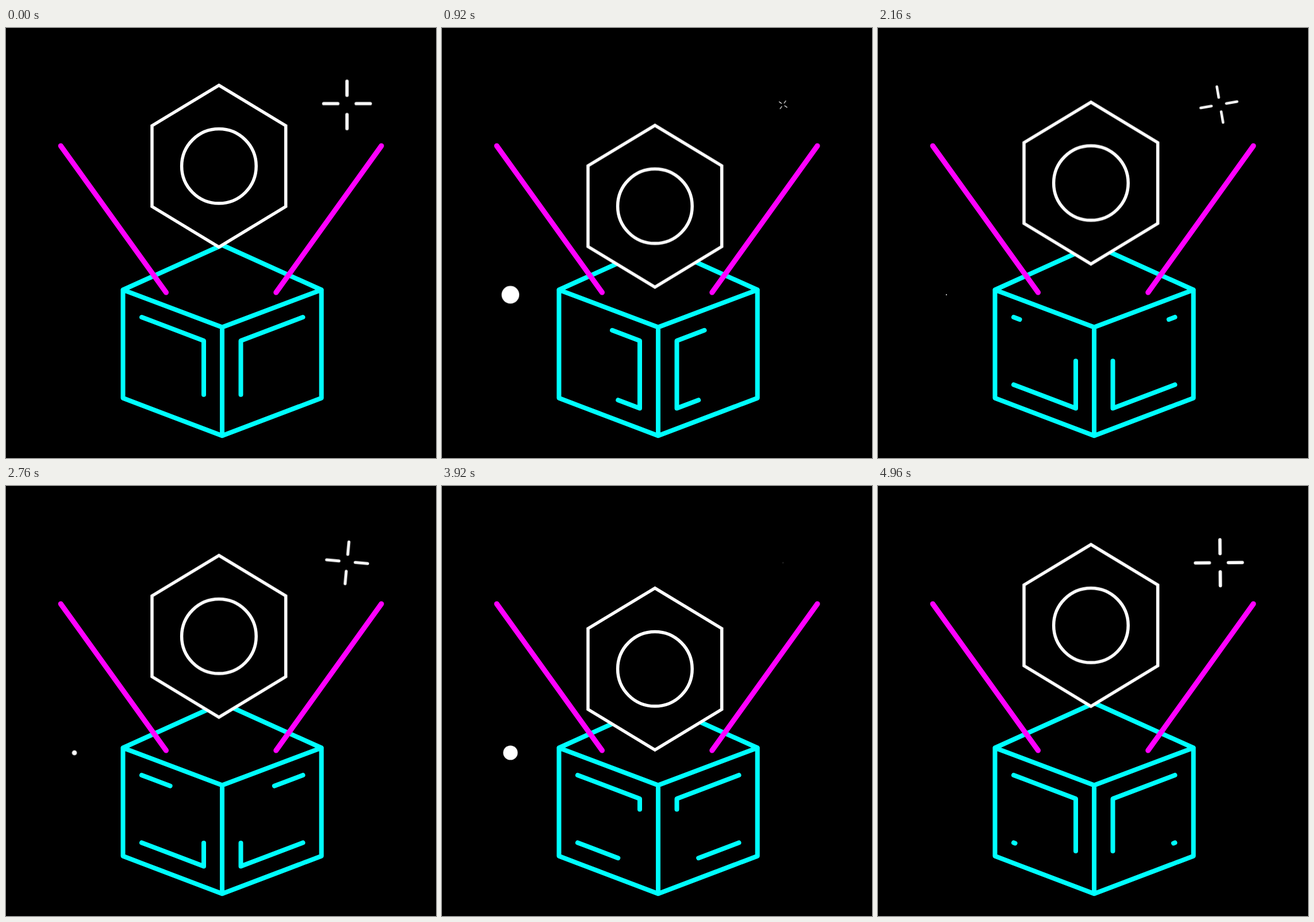
An HTML page for the animation above (5 s loop, 748x748 px).

```html
<!DOCTYPE html>
<html lang="en">
<head>
<meta charset="utf-8">
<title>Open box</title>
<style>
  html, body { margin: 0; width: 100%; height: 100%; overflow: hidden; background: #000; }
  svg { display: block; width: 100%; height: 100%; fill: none; stroke-linecap: round; }

  .box { stroke: #0ff; stroke-width: 8; stroke-linejoin: round; }
  .rays { stroke: #f0f; stroke-width: 9; }
  .nut { fill: #000; stroke: #fff; stroke-width: 5.5; animation: bob 2.5s infinite; }
  .spark { stroke: #fff; stroke-width: 5.7; animation: twinkle 2.5s infinite; }
  .dot { fill: #fff; animation: pulse 2.5s infinite; }
  .trim { stroke-dasharray: 60 40; animation: run 5s linear infinite; }

  @keyframes run {
    from { stroke-dashoffset: 0; }
    to { stroke-dashoffset: -100; }
  }
  @keyframes bob {
    0% { transform: translateY(0); animation-timing-function: cubic-bezier(.063, 0, .609, 1); }
    51.2% { transform: translateY(80px); animation-timing-function: cubic-bezier(.391, 0, .937, 1); }
    100% { transform: translateY(0); }
  }
  @keyframes twinkle {
    0% { transform: rotate(0deg) scale(1); animation-timing-function: cubic-bezier(.3, 0, .7, .95); }
    50.2% { transform: rotate(45deg) scale(0); animation-timing-function: cubic-bezier(.46, 0, .57, .85); }
    100% { transform: rotate(90deg) scale(1); }
  }
  @keyframes pulse {
    0% { transform: scale(0); animation-timing-function: cubic-bezier(.333, .32, .7, .6); }
    50.2% { transform: scale(1); animation-timing-function: cubic-bezier(.05, .5, .45, 1); }
    100% { transform: scale(0); }
  }
</style>
</head>
<body>
<svg viewBox="0 0 748 748">
  <g class="box">
    <path d="M203.5 455.5 376 377.5 548.7 455.5V643.7L376 709.3 203.5 643.7ZL376 520.5 548.7 455.5M376 520.5V709.3"/>
    <path class="trim" pathLength="99.99" d="M236 503 344 544V661.5L236 620.5"/>
    <path class="trim" pathLength="99.99" d="M516.5 503 408.5 544V661.5L516.5 620.5"/>
  </g>
  <path class="rays" d="M95.2 205 278.5 460M653 205 469.8 460"/>
  <g class="nut">
    <path d="M370.4 99.6 486.7 170V310.5L370.4 381 254 310.5V170Z"/>
    <circle cx="370.4" cy="240.3" r="64.8"/>
  </g>
  <g transform="translate(593.2 133.5)">
    <path class="spark" d="M0-41V-16.5M0 17V41.5M-40.5-2H-16M16-2H40.5"/>
  </g>
  <g transform="translate(119 464)">
    <circle class="dot" r="22.3"/>
  </g>
</svg>
</body>
</html>
```
